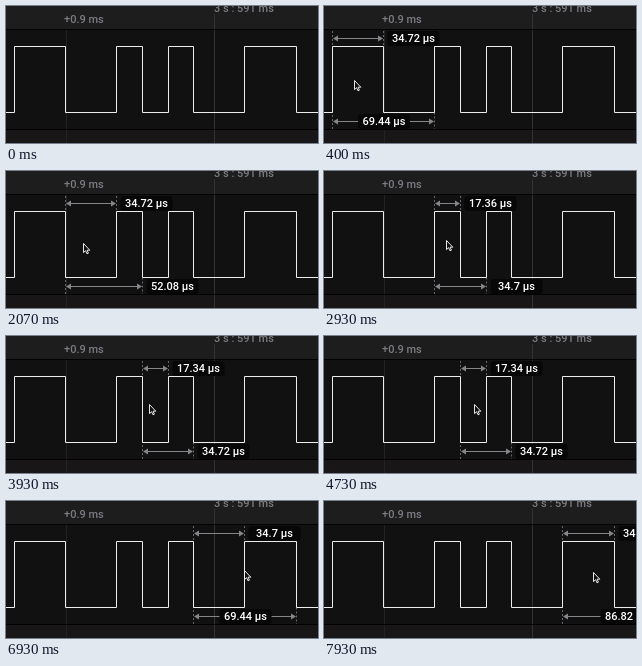
These frames come from a looping animation (312 by 137 pixels, 8 s). An HTML page:

```html
<!DOCTYPE html>
<html lang="en">
<head>
<meta charset="utf-8">
<title>Pulse timing</title>
<style>
  html, body { margin: 0; width: 100%; height: 100%; overflow: hidden; background: #111; }
  svg { display: block; width: 312px; height: 137px; }
  text { font: 500 11px Roboto, sans-serif; fill: #fff; }
  .ruler text { fill: #7c7c82; }
  .measure path { stroke: #85858a; fill: none; }
  .measure .dash { stroke: #66666b; stroke-dasharray: 2 2; }
  .measure .head { fill: #85858a; stroke: none; }
</style>
</head>
<body>
<svg viewBox="0 0 312 137">
  <rect width="312" height="137" fill="#111"/>
  <rect width="312" height="23" fill="#1d1d1e"/>
  <rect y="124" width="312" height="13" fill="#191617"/>
  <path d="M60.5 24V137" stroke="#232324"/>
  <path d="M208.5 8V137" stroke="#333335"/>
  <path d="M0 23.5H312M0 123.5H312" stroke="#020202"/>
  <g class="ruler">
    <text x="58" y="17">+0.9 ms</text>
    <text x="208" y="6">3 s : 591 ms</text>
  </g>
  <g class="measure" id="measure">
    <path class="dash" id="dash"/>
    <g id="width"></g>
    <g id="period"></g>
  </g>
  <path id="wave" fill="none" stroke="#ececec"/>
  <path id="cursor" d="M.5 .5V9.6L2.6 7.7L4 10.8L5.4 10.2L4.1 7.2H6.8Z" fill="#111" stroke="#fff" stroke-width=".9"/>
</svg>
<script>
const LOOP = 8000, STEP = 1000 / 15;
const LOW = 106.5, HIGH = 40.5;
const edges = [8, 59, 110, 136, 162, 187, 238, 290, 365];
const times = [34.72, 34.72, 17.36, 17.34, 17.38, 34.7, 34.74, 52.08];

// Cursor moves: first step, last step, x, y at the end
const start = [30, 140];
const moves = [
  [0, 6, 30, 74], [19, 31, 77, 72], [39, 44, 122, 69], [56, 60, 147, 68],
  [70, 75, 180, 67], [85, 91, 196, 65], [100, 107, 265, 71], [116, 119, 269, 71]
];

const $ = id => document.getElementById(id);
const smooth = p => p * p * (3 - 2 * p);
const clamp = p => Math.max(0, Math.min(1, p));

$('wave').setAttribute('d', `M0 ${LOW}` +
  edges.map((x, i) => `H${x + .5}V${i % 2 ? LOW : HIGH}`).join(''));

function cursorAt(step) {
  let [x, y] = start;
  for (const [from, to, nx, ny] of moves) {
    const p = smooth(clamp((step - from) / (to - from)));
    x += (nx - x) * p;
    y += (ny - y) * p;
  }
  return [Math.round(x), Math.round(y)];
}

function arrow(a, b, y, time) {
  const inside = b - a > 90;
  const x = inside ? (a + b) / 2 + 1 : b + 30.5;
  const label = +time.toFixed(2) + ' µs';
  return `<path d="M${a + 2} ${y}H${b - 1}"/>
    <path class="head" d="M${a + 1} ${y}l5 -3v6zM${b} ${y}l-5 -3v6z"/>
    <rect x="${x - 26}" y="${y - 7.5}" width="52" height="15" rx="3" fill="#070707"/>
    <text x="${x}" y="${y + 3.9}" text-anchor="middle">${label}</text>`;
}

let shown;
function measure(i) {
  if (i === shown) return;
  shown = i;
  $('measure').style.display = i < 0 ? 'none' : '';
  if (i < 0) return;
  const [a, b, c] = edges.slice(i, i + 3);
  $('dash').setAttribute('d',
    `M${a + .5} 25V123M${b + .5} 25V${HIGH}M${c + .5} ${LOW}V123`);
  $('width').innerHTML = arrow(a, b, 32.5, times[i]);
  $('period').innerHTML = arrow(a, c, 115.5, times[i] + times[i + 1]);
}

function draw(now) {
  const step = Math.floor((now % LOOP + 4) / STEP) % 120;
  const [x, y] = cursorAt(step);
  $('cursor').setAttribute('transform', `translate(${x} ${y})`);
  measure(y < 123 ? edges.findIndex(e => x <= e) - 1 : -1);
  requestAnimationFrame(draw);
}
draw(performance.now());
</script>
</body>
</html>
```
